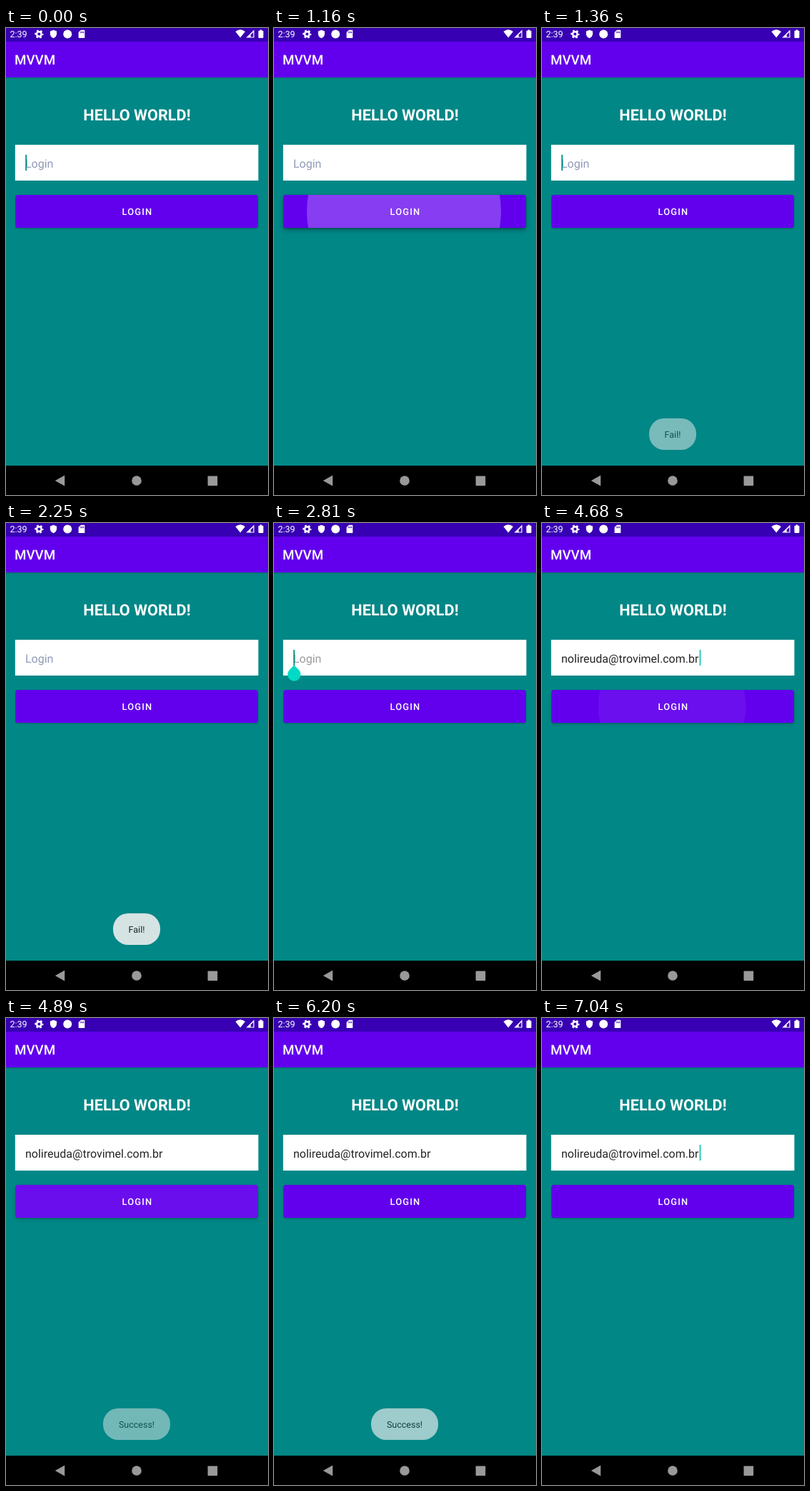
Recreate the animation shown at these times as an HTML page. Size 367x652 px, loop 7180 ms.

```html
<!DOCTYPE html>
<html lang="en">
<head>
<meta charset="utf-8">
<title>Login screen</title>
<style>
  html, body { margin: 0; width: 100%; height: 100%; overflow: hidden; background: #018786; }
  svg { display: block; width: 100vw; height: 100vh; }
  text { font-family: Roboto, sans-serif; font-size: 16px; text-rendering: geometricPrecision; }
  .medium { font-weight: 500; }
  .mid { text-anchor: middle; }

  .anim { animation: 7180ms linear infinite; }
  .hard { animation-timing-function: step-end; }

  /* Field */
  .hint { animation-name: hint; }
  .email { animation-name: email; }
  .handle { animation-name: handle; }
  .popup { animation-name: popup; }
  .caret-start { animation-name: caret-start; }
  .caret-end { animation-name: caret-end; }
  @keyframes hint {
    0% { fill: #909bb9; }
    33.357% { fill: #9c9c9c; }
    52.437%, 100% { fill: transparent; }
  }
  @keyframes email { 0% { opacity: 0; } 52.437%, 100% { opacity: 1; } }
  @keyframes handle {
    0%, 52.437%, 100% { opacity: 0; }
    33.357% { opacity: 1; }
  }
  @keyframes popup {
    0%, 41.086%, 54.248%, 100% { opacity: 0; }
    43.245%, 52.089% { opacity: 1; }
  }
  @keyframes caret-start {
    0%, 8.287%, 17.549%, 26.811%, 35.863%, 44.777% { opacity: 1; }
    3.83%, 13.022%, 22.075%, 31.267%, 40.32%, 49.234%, 100% { opacity: 0; }
  }
  @keyframes caret-end {
    0%, 57.033%, 66.086%, 75.139%, 84.331%, 93.245% { opacity: 0; }
    52.437%, 61.49%, 70.613%, 79.596%, 88.788%, 97.981%, 100% { opacity: 1; }
  }

  /* Button press */
  .press { animation-name: press; }
  .ripple { animation-name: press, grow; transform-box: fill-box; transform-origin: center; }
  @keyframes press {
    0%, 15.46%, 18.9%, 65.014%, 68.454%, 100% { opacity: 0; }
    16.156%, 17.521%, 65.71%, 67.075% { opacity: 1; }
  }
  @keyframes grow {
    0%, 15.46%, 65.014% { transform: scale(.593); animation-timing-function: cubic-bezier(.4, 0, .2, 1); }
    17.521%, 67.075% { transform: scale(1); animation-timing-function: step-end; }
    60%, 100% { transform: scale(.593); }
  }

  /* Toasts: decelerate in, accelerate out */
  .fail { animation-name: fail; }
  .success { animation-name: success; }
  @keyframes fail {
    0%, 39.109%, 100% { opacity: 0; }
    17.409% { opacity: 0; animation-timing-function: cubic-bezier(.333, .667, .667, 1); }
    21.978% { opacity: .9; }
    34.54% { opacity: .9; animation-timing-function: cubic-bezier(.333, 0, .667, .333); }
  }
  @keyframes success {
    0%, 88.621%, 100% { opacity: 0; }
    66.671% { opacity: 0; animation-timing-function: cubic-bezier(.333, .667, .667, 1); }
    71.24% { opacity: .9; }
    84.053% { opacity: .9; animation-timing-function: cubic-bezier(.333, 0, .667, .333); }
  }
  .toast rect { fill: #edeeee; }
  .toast text { font-size: 12.5px; fill: #1c1c1c; }
</style>
</head>
<body>
<svg viewBox="0 0 367 652" preserveAspectRatio="none">
  <defs>
    <linearGradient id="shade" x2="0" y2="1">
      <stop stop-opacity=".16"/>
      <stop offset="1" stop-opacity="0"/>
    </linearGradient>
    <filter id="soft" x="-10%" y="-30%" width="120%" height="160%"><feGaussianBlur stdDeviation="1"/></filter>
    <filter id="softer" x="-10%" y="-30%" width="120%" height="160%"><feGaussianBlur stdDeviation="3"/></filter>
    <clipPath id="button"><rect x="13.2" y="233" width="339.8" height="46" rx="3.5"/></clipPath>
  </defs>

  <rect width="367" height="652" fill="#018786"/>
  <rect y="69" width="367" height="3" fill="url(#shade)"/>
  <rect y="18" width="367" height="51" fill="#6200ee"/>
  <rect width="367" height="19" fill="#3700b3"/>

  <!-- Status bar -->
  <g fill="#fff">
    <text x="5.5" y="13.4" style="font-size:12.5px">2:39</text>
    <g fill="none" stroke="#fff">
      <circle cx="46.3" cy="8.6" r="3.3" stroke-width="2.6"/>
      <circle cx="46.3" cy="8.6" r="5.1" stroke-width="2" stroke-dasharray="2.67" stroke-dashoffset="1.3"/>
    </g>
    <path d="M61.8 4.6 66.4 2.7 71 4.6V8.2Q70.7 12.6 66.4 14.2 62.1 12.6 61.8 8.2Z"/>
    <circle cx="86.2" cy="8.5" r="6"/>
    <path d="M105 2.7H109.4Q110.3 2.7 110.3 3.6V13.2Q110.3 14.1 109.4 14.1H102.5Q101.6 14.1 101.6 13.2V6.1Z"/>
    <path d="M104.8 4.8v2.4M106.7 4.8v2.4M108.6 4.8v2.4" stroke="#3700b3"/>
    <path d="M321.4 4.9Q328.2-.3 335 4.9L328.2 13.4Z"/>
    <path d="M336.4 13.6 347.6 2.4V13.6Z"/>
    <path d="M342.8 9.4 346.4 5.8V12.4H342.8Z" fill="#3700b3"/>
    <path d="M355.6 2.5h2.8v1.2h1.3q.8 0 .8.8v8.6q0 .8-.8.8h-5.4q-.8 0-.8-.8V4.5q0-.8.8-.8h1.3Z"/>
  </g>

  <g fill="#fff">
    <text class="medium" x="12" y="51.4" style="font-size:18.8px">MVVM</text>
    <text class="mid" x="183.5" y="128.6" style="font-size:21.7px;font-weight:700">HELLO WORLD!</text>
  </g>

  <!-- Login field -->
  <rect x="12.8" y="163" width="340.7" height="50" fill="#fff"/>
  <text class="anim hard hint" x="27" y="194.5">Login</text>
  <text class="anim hard email" x="27" y="194.5" fill="#242424">nolireuda@trovimel.com.br</text>
  <rect class="anim hard caret-start" x="27.2" y="177" width="1.8" height="22" fill="#019488"/>
  <rect class="anim hard caret-end" x="220.6" y="177" width="1.9" height="22" fill="#22c5bb"/>

  <!-- Button -->
  <rect x="13.2" y="234" width="339.8" height="46" rx="3.5" opacity=".25" filter="url(#soft)"/>
  <g class="anim press">
    <rect x="13.2" y="236" width="339.8" height="46" rx="3.5" opacity=".3" filter="url(#softer)"/>
  </g>
  <g clip-path="url(#button)">
    <rect x="13" y="233" width="341" height="46" fill="#6200ee"/>
    <circle class="anim ripple" cx="182" cy="256" r="172" fill="#fff" fill-opacity=".24"/>
  </g>
  <text class="medium mid" x="184" y="260.9" fill="#fff" style="font-size:12.9px;letter-spacing:.0893em">LOGIN</text>

  <path class="anim hard handle" d="M28.2 198.6 34.7 205.1A9.2 9.2 0 1 1 21.7 205.1Z" fill="#03dac5"/>
  <g class="anim popup">
    <rect x="13" y="128" width="62" height="43" rx="7" opacity=".3" filter="url(#soft)"/>
    <rect x="13" y="127" width="62" height="43" rx="7" fill="#fff"/>
    <text class="medium mid" x="44.3" y="153.6" fill="#0d2423" style="font-size:12.6px">Paste</text>
  </g>

  <!-- Toasts -->
  <g class="anim toast fail">
    <rect x="150" y="545" width="66" height="44" rx="21"/>
    <text class="mid" x="183" y="572">Fail!</text>
  </g>
  <g class="anim toast success">
    <rect x="136" y="545" width="94" height="44" rx="21"/>
    <text class="mid" x="183" y="572">Success!</text>
  </g>

  <!-- Navigation bar -->
  <rect y="611" width="367" height="41"/>
  <g fill="#999">
    <path d="M68.8 632 82.2 624.6V639.6Z"/>
    <circle cx="183" cy="632" r="6.8"/>
    <rect x="282.6" y="625.4" width="13.6" height="13.6" rx=".8"/>
  </g>
</svg>
</body>
</html>
```
